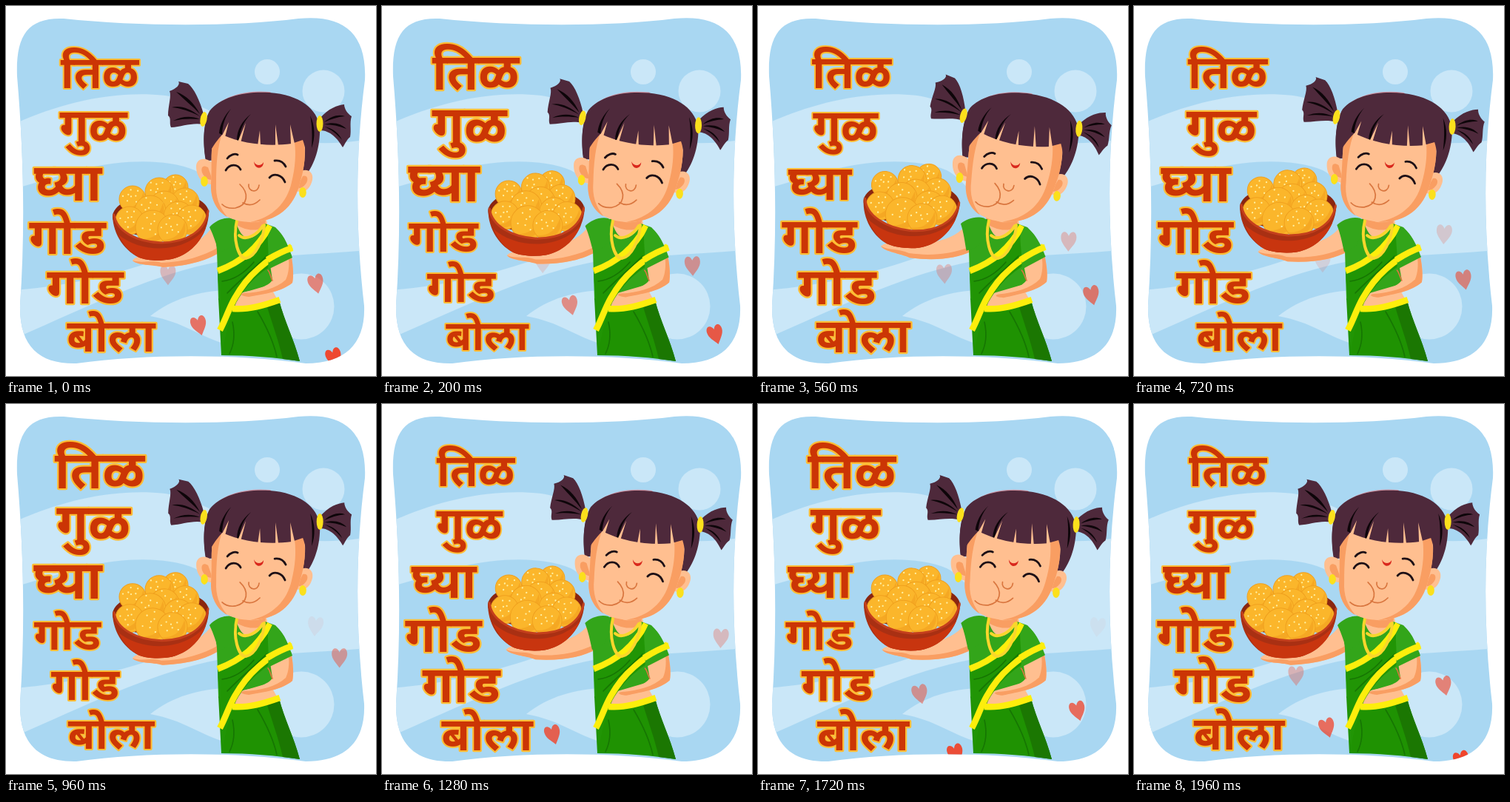
Animation, 500 px wide and 500 px high, one loop 2 s. Source, as an HTML page:

```html
<!DOCTYPE html>
<html lang="mr">
<head>
<meta charset="utf-8">
<style>
html, body { margin: 0; width: 100%; height: 100%; overflow: hidden; background: #fff; }
svg { display: block; width: 100vw; height: 100vh; }
#words text {
  font-family: "Noto Sans Devanagari", "Noto Sans", sans-serif; font-weight: 700;
  text-anchor: middle; fill: #cb3505; stroke: #fdbd35; stroke-width: 4;
  stroke-linejoin: round; paint-order: stroke;
}
.line { fill: none; stroke-linecap: round; stroke-linejoin: round; }
.ink { stroke: #1d1016; stroke-width: 2.8; }
.slit { fill: #0d0509; }
.crease { stroke: #d9763f; stroke-width: 1.7; }
.hem { stroke: #fdee0c; stroke-width: 8.5; stroke-linecap: butt; }
.fold { stroke: #167503; stroke-width: 1.6; }
.skin { fill: #ffbf90; }
.shade { fill: #f99e62; }
.hair { fill: #4e293b; }
.blouse { fill: #33a51a; }
.gold { fill: #fbe01c; }
</style>
</head>
<body>
<svg viewBox="0 0 500 500">
  <defs>
    <clipPath id="card"><path d="M15 95C13 40 29 15 78 17C180 28 310 28 395 17C455 11 488 36 485 100C472 200 472 300 484 405C486 455 460 483 405 483C310 470 190 470 95 483C45 484 18 460 19 405C26 300 24 200 15 95Z"/></clipPath>
  </defs>

  <g clip-path="url(#card)">
    <rect width="500" height="500" fill="#a9d7f2"/>
    <g fill="#cae7f8">
      <path d="M10 160C70 132 145 113 215 121C290 132 340 205 490 180V330C420 336 350 338 290 345C200 362 120 402 10 450V384C90 378 150 362 215 340C260 322 300 300 330 285C290 262 280 235 255 222C215 206 160 208 110 219C75 228 45 238 10 247Z"/>
      <path d="M195 419C225 395 262 385 300 384V458C262 447 240 427 195 419Z"/>
      <circle cx="353" cy="89" r="17"/>
      <circle cx="429" cy="115" r="28.5"/>
      <circle cx="399" cy="406" r="44.5"/>
    </g>
    <g id="hearts"></g>
  </g>

  <g id="forearm">
    <path class="skin" d="M278 299C270 312 256 321 236 328L205 334C188 336 174 338 171 344C178 351 198 349 212 353C250 351 274 343 292 331Z"/>
    <path class="shade" d="M171 344C178 351 198 349 212 353C250 351 274 343 292 331L289 325C265 339 240 346 210 347C195 343 184 348 171 344Z"/>
  </g>

  <g id="body">
    <path class="skin" d="M308 278H350L354 300L330 330L309 300Z"/>
    <path class="shade" d="M308 281C322 294 337 295 351 288L350 299C333 307 317 300 309 294Z"/>
    <path class="blouse" d="M310 288C317 320 335 322 350 294L364 299C378 312 382 326 386 342L350 390L287 397L285 330C282 312 287 296 295 287Z"/>
    <path class="skin" d="M315 389L356 377L368 399L306 412Z"/>
    <path fill="#1f9202" d="M287 395L306 409C328 411 350 403 369 398C376 425 389 450 397 480C365 475 330 472 291 472Z"/>
    <path fill="#1b7702" d="M352 403L369 398C376 425 389 450 397 480L374 477C368 450 358 425 352 403Z"/>
    <path fill="#219505" d="M360 299L386 337C353 351 328 370 311 401C301 423 297 448 293 463L286 362C320 352 342 330 360 299Z"/>
    <path class="line hem" d="M357 297C340 327 320 345 286 358"/>
    <path class="line hem" d="M386 325C350 344 327 363 309 395C301 409 297 423 289 438"/>
    <path class="line hem" d="M306 409C328 411 350 404 370 397"/>
    <path class="line fold" d="M306 427C310 445 307 460 302 470M340 413C353 435 362 456 366 474M292 372C310 370 323 360 335 346M299 388C316 370 335 355 352 338"/>
    <path class="line" stroke="#f9d62c" stroke-width="4" d="M312 290C306 315 314 341 324 341C337 339 348 316 349 296M315 310C324 318 340 309 347 297"/>
  </g>
  <g id="farArm">
    <path class="skin" d="M357 350L386 340C388 352 389 365 387 374C373 386 350 389 328 393C318 392 315 388 324 386C340 384 357 377 360 370Z"/>
    <path class="shade" d="M387 374C373 386 350 389 328 393C318 392 314 389 322 388C344 387 365 382 378 370C382 362 383 350 382 342L386 340C388 352 389 365 387 374Z"/>
    <path class="line crease" d="M360 371C357 365 357 360 354 357"/>
    <path class="blouse" d="M360 298C374 305 382 325 387 340L354 356C356 338 353 320 354 310Z"/>
    <path class="line hem" d="M387 327C374 331 363 337 353 343"/>
  </g>
  <path id="sleeve" class="blouse" d="M306 287C294 285 282 291 275 299C281 311 284 322 288 334L303 326C309 311 310 300 306 287Z"/>

  <g id="head">
    <g id="tailL">
      <path class="hair" d="M267 146C262 128 254 111 246 105L233 102C236 106 230 112 221 115C224 121 219 135 219 148C224 152 220 158 223 164C238 163 252 157 267 160Z"/>
      <path class="slit" d="M262 146C254 131 244 121 230 116C240 126 252 135 262 146ZM262 149C248 138 235 134 224 137C236 138 248 142 262 149ZM262 153C250 148 238 149 226 155C240 152 250 152 262 153Z"/>
    </g>
    <g id="tailR">
      <path class="hair" d="M424 152C436 138 448 134 457 133C457 139 462 146 467 149C464 158 467 168 465 177C460 181 458 187 455 191C448 179 438 168 424 168Z"/>
      <path class="slit" d="M430 157C440 148 450 146 458 149C448 150 438 153 430 157ZM430 160C443 156 453 159 460 166C450 162 440 160 430 160ZM430 163C442 165 450 172 454 181C447 173 440 167 430 163Z"/>
    </g>
    <path class="line" stroke="#c9909f" stroke-width="4" d="M284 136C304 120 330 116 356 118"/>
    <path class="hair" d="M270 209C266 187 266 158 275 142C291 122 324 115 356 117C397 120 421 139 424 164C425 190 417 214 405 229L390 205Z"/>
    <path class="skin" d="M279 212C269 203 257 206 257 217C257 230 265 242 280 241ZM399 223C408 219 416 225 414 235C411 248 402 255 391 249Z"/>
    <path class="shade" d="M273 218C266 214 263 218 265 225C268 232 273 235 279 235ZM401 230C407 228 409 234 406 239C402 245 398 247 393 246Z"/>
    <path class="skin" d="M283 164C275 190 279 214 277 240C276 268 291 291 330 292C364 292 390 274 398 236C405 210 406 188 401 172Z"/>
    <path class="shade" d="M283 164C275 190 279 214 277 240C276 260 284 277 299 285C288 272 283 258 284 240C284 216 285 192 293 169Z"/>
    <path class="shade" d="M402 180C406 200 403 220 398 236C390 274 364 292 330 292C360 286 380 266 386 238C391 218 392 200 390 184Z"/>
    <path class="hair" d="M270 207C265 176 267 153 282 137C310 116 360 112 394 127C419 140 425 164 420 190L408 213C406 202 405 192 401 181L386 186C355 190 322 187 292 174C282 185 277 194 270 207Z"/>
    <path class="slit" d="M304 139C294 149 289 161 288 172L292 174C292 162 296 149 304 139ZM331 146C319 155 312 168 312 181L315 182C316 168 321 156 331 146ZM411 148C418 162 418 178 413 192C414 177 414 162 411 148Z"/>
    <path class="skin" d="M292 175L301 157L296 177ZM313 184L324 158L317 185ZM340 189L343 168L344 189ZM364 189L364 160L368 189ZM385 187L384 160L390 186Z"/>
    <g class="gold">
      <ellipse cx="267" cy="153" rx="4.5" ry="10" transform="rotate(10 267 153)"/>
      <ellipse cx="424" cy="159" rx="4.5" ry="11"/>
      <ellipse cx="268" cy="237" rx="4.8" ry="7"/>
      <ellipse cx="401" cy="252" rx="4.8" ry="7"/>
    </g>
    <path class="line ink" d="M297 222C302 213 313 213 317 221M356 232C362 225 373 228 377 238M299 206C303 201 309 199 313 201M363 209C370 208 375 211 378 217"/>
    <path class="line crease" d="M328 241C326 251 341 254 342 242M316 241C329 253 327 269 310 273C302 274 296 272 292 268M320 266C329 271 337 268 343 262"/>
    <path fill="#d9281d" d="M335 210C337 216 345 217 348 211C348 221 336 222 335 210Z"/>
  </g>

  <g id="bowl">
    <ellipse cx="209" cy="282" rx="65" ry="30" fill="#8a2610" transform="rotate(-3 209 282)"/>
    <g id="sweets"></g>
    <path fill="#a93013" d="M144 279C146 301 172 319 210 320C248 319 273 301 274 273C276 302 257 334 224 342C208 345 190 344 180 340C157 329 143 304 144 279Z"/>
    <path fill="#c8350f" d="M152 309C182 334 240 336 270 300C262 322 245 337 224 342C208 345 190 344 180 340C168 334 158 322 152 309Z"/>
    <path class="line" stroke="#c43f1c" stroke-width="3" d="M146 282C149 304 176 319 210 320C246 319 270 303 273 277"/>
  </g>

  <g id="words"></g>
</svg>
<script>
const LOOP = 2000, STEP = 40, TAU = 2 * Math.PI;
const $ = id => document.getElementById(id);
const add = (parent, tag, attrs, text = '') => {
  const node = document.createElementNS('http://www.w3.org/2000/svg', tag);
  for (const key in attrs) node.setAttribute(key, attrs[key]);
  node.textContent = text;
  return parent.appendChild(node);
};
const pose = (id, transform) => $(id).setAttribute('transform', transform);

// Sweets, back to front: x, y, radius
[[229, 245, 17], [171, 261, 18], [207, 251, 19], [242, 265, 19], [214, 270, 20],
 [195, 277, 21], [167, 290, 19], [233, 284, 20], [251, 289, 20], [198, 299, 23], [225, 302, 20]
].forEach(([x, y, r]) => {
  const ball = add($('sweets'), 'g', { transform: `translate(${x} ${y})` });
  add(ball, 'circle', { r, fill: '#fbb62b', stroke: '#f0a01e', 'stroke-width': 1 });
  add(ball, 'path', {
    d: `M${r * .8} ${-r * .5}A${r} ${r} 0 0 1 ${-r * .7} ${r * .7}Q${r * .5} ${r * .7} ${r * .8} ${-r * .5}Z`,
    fill: '#f3a21f', opacity: .65
  });
  for (let i = 0; i < 8; i++) {
    const a = i * 2.4 + x, d = r * .25 * Math.sqrt(i);
    add(ball, 'circle', { cx: d * Math.cos(a) - 2, cy: d * Math.sin(a) - r * .2, r: 1.15, fill: '#fff0a0' });
  }
});

// Words: centre, baseline, font size, time of the largest size
const words = [
  ['तिळ', 126.5, 86, 110.5, 61, 305], ['गुळ', 118, 174, 184, 62, 220],
  ['घ्या', 83.5, 242, 261.5, 65, 155], ['गोड', 83, 311, 331.5, 59, -18],
  ['गोड', 107, 378, 399.5, 60, -85], ['बोला', 142, 442, 465, 56.5, -170]
].map(([text, x, y, base, size, peak]) => ({
  x, y, peak, node: add($('words'), 'text', { y: base - y, 'font-size': size }, text)
}));

// Hearts: birth, lifetime, rise and [age, x] points
const hearts = [
  { birth: 1014, life: 1400, rise: 158, path: [[0, 240], [266, 231], [466, 219], [946, 219], [1400, 216]] },
  { birth: 1648, life: 1250, rise: 170, path: [[0, 268], [326, 261], [760, 249], [1080, 255], [1250, 257]] },
  { birth: 1282, life: 1800, rise: 184, path: [[0, 452], [198, 445], [678, 419], [1118, 420], [1800, 418]] },
  { birth: 1950, life: 1850, rise: 182, path: [[0, 443], [450, 456], [770, 446], [1330, 458], [1850, 459]] }
];
for (const heart of hearts)
  heart.node = add($('hearts'), 'path', {
    fill: '#f0452c',
    d: 'M0 14C-5 7 -10.5 2 -10.5 -5C-10.5 -14 -3 -15 0 -7C3 -15 10.5 -14 10.5 -5C10.5 2 5 7 0 14Z'
  });

function along(points, t) {
  let i = 1;
  while (i < points.length - 1 && t > points[i][0]) i++;
  const [t0, a] = points[i - 1], [t1, b] = points[i];
  const u = Math.min(1, (t - t0) / (t1 - t0));
  return a + (b - a) * (1 - Math.cos(Math.PI * u)) / 2;
}

function draw(t) {
  const sway = (1 - Math.cos(TAU * t / 1000)) / 2;
  pose('head', `rotate(${4.4 * sway} 337 295)`);
  pose('tailL', `translate(${1.5 * sway}) rotate(${5 * sway} 267 153)`);
  pose('tailR', `rotate(${3 * sway} 424 160)`);
  pose('forearm', `translate(${-3 * sway}) rotate(${10 * sway} 285 322)`);
  pose('bowl', `translate(${-2.6 * sway} ${-17 * sway}) rotate(${5 * sway} 209 295)`);
  pose('sleeve', `rotate(${9 * sway} 306 290)`);
  pose('farArm', `rotate(${-2.5 * sway} 358 300)`);

  for (const { x, y, peak, node } of words) {
    const swell = (1 + Math.cos(TAU * 3 * (t - peak) / LOOP)) / 2;
    node.setAttribute('transform', `translate(${x} ${y}) scale(${1 + .155 * swell})`);
  }

  for (const { birth, life, rise, path, node } of hearts) {
    const age = (t - birth + LOOP) % LOOP;
    const y = 483 - rise * Math.sin(Math.PI / 2 * Math.min(1, age / 1800));
    const tilt = along([[0, -18], [700, -13], [1000, 0], [1800, 6]], age);
    node.setAttribute('transform', `translate(${along(path, age)} ${y}) rotate(${tilt})`);
    node.setAttribute('opacity', Math.max(0, 1 - age / life));
  }
}

const start = performance.now();
function tick() {
  draw(Math.floor((performance.now() - start) % LOOP / STEP) * STEP);
  requestAnimationFrame(tick);
}
draw(0);
requestAnimationFrame(tick);
</script>
</body>
</html>
```
